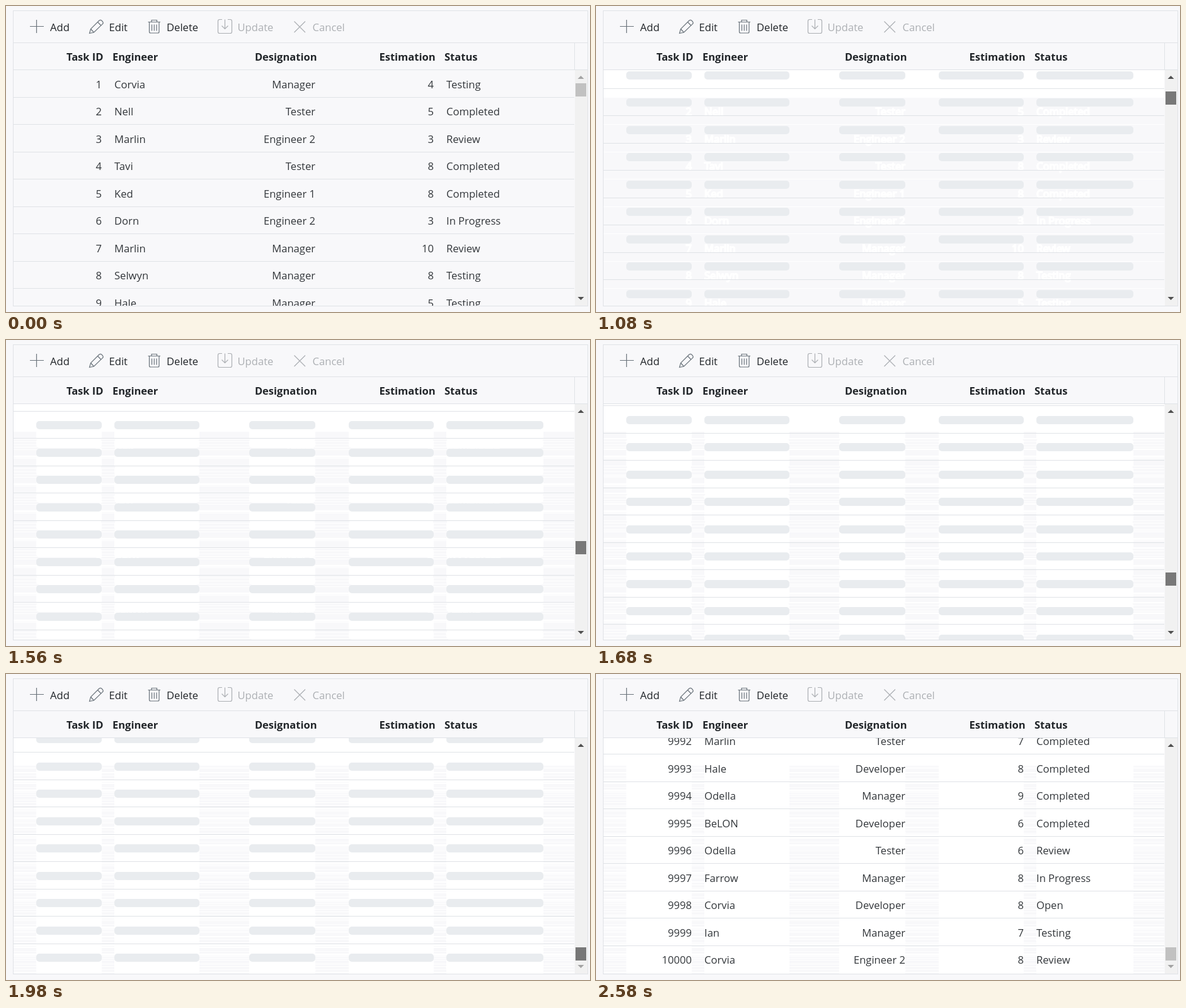
Animation of 927x487 px, one loop 3.66 s. Source, as an HTML page with a canvas:

```html
<!DOCTYPE html>
<html lang="en">
<head>
<meta charset="utf-8">
<title>Task grid scrolling</title>
<style>
html, body { margin: 0; width: 100%; height: 100%; overflow: hidden; background: #f8f8fa; }
canvas { display: block; }
</style>
</head>
<body>
<canvas id="stage" width="927" height="487"></canvas>
<script>
const ctx = document.getElementById('stage').getContext('2d');
const LOOP = 3660, STEP = 60, ROW = 43.5;
const SCROLL_START = 1080, LOADED = 2280;
const BACK = '#f8f8fa', LINE = '#e0e3e7', MUTED = '#adb0b4';
const INK = '#212529', CELL_INK = '#33373b';
const FONT = '16.6px "Open Sans", "Noto Sans", sans-serif';
const BOLD = '700 16.5px "Open Sans", "Noto Sans", sans-serif';

const columns = [
  { title: 'Task ID', left: 48, right: 152, align: 'right' },
  { title: 'Engineer', left: 172, right: 307, align: 'left' },
  { title: 'Designation', left: 386, right: 491, align: 'right' },
  { title: 'Estimation', left: 544, right: 679, align: 'right' },
  { title: 'Status', left: 699, right: 853, align: 'left' }
];

const parse = text => text.trim().split('\n').map(row => row.split('|'));
const firstRows = parse(`
1|Corvia|Manager|4|Testing
2|Nell|Tester|5|Completed
3|Marlin|Engineer 2|3|Review
4|Tavi|Tester|8|Completed
5|Ked|Engineer 1|8|Completed
6|Dorn|Engineer 2|3|In Progress
7|Marlin|Manager|10|Review
8|Selwyn|Manager|8|Testing
9|Hale|Manager|5|Testing`);
const lastRows = parse(`
9992|Marlin|Tester|7|Completed
9993|Hale|Developer|8|Completed
9994|Odella|Manager|9|Completed
9995|BeLON|Developer|6|Completed
9996|Odella|Tester|6|Review
9997|Farrow|Manager|8|In Progress
9998|Corvia|Developer|8|Open
9999|Ian|Manager|7|Testing
10000|Corvia|Engineer 2|8|Review`);

// Thumb position at each scroll step; the row offset follows from it.
const thumbTops = [136, 149, 166, 186, 209, 236, 265, 293, 320, 346, 370, 391, 409, 422, 431, 434.2];
const rowOffset = top => {
  const y = 131.25 - 1.0435 * (top - 136) - 101;
  return 101 + ((y % ROW) + ROW) % ROW;
};
const views = [
  { offset: 145, rows: firstRows },
  ...thumbTops.map(top => ({ offset: rowOffset(top) })),
  { offset: 127.5, rows: lastRows }
];
// The very last row of the table has no line below it.
const reachesEnd = view => views.indexOf(view) >= thumbTops.length;

function rect(x, y, w, h, color) {
  ctx.fillStyle = color;
  ctx.fillRect(x, y, w, h);
}

function label(text, x, y, color = INK, align = 'left', font = FONT) {
  ctx.font = font;
  ctx.textAlign = align;
  ctx.fillStyle = color;
  ctx.fillText(text, x, y);
}

function icon(path, color) {
  ctx.strokeStyle = color;
  ctx.lineWidth = 1.2;
  ctx.stroke(new Path2D(path));
}

function triangle(y, dir, color) {
  ctx.fillStyle = color;
  ctx.beginPath();
  ctx.moveTo(907.5, y + 2.5 * dir);
  ctx.lineTo(917.5, y + 2.5 * dir);
  ctx.lineTo(912.5, y - 2.5 * dir);
  ctx.fill();
}

// With erase set, the view's marks are wiped to white and the rest is left alone.
function drawView(view, erase) {
  const { offset, rows } = view;
  const lines = reachesEnd(view) ? 8 : 10;
  for (let i = 0; i < 10; i++) {
    const y = Math.floor(offset + i * ROW);
    if (i < lines) rect(12, y, 890, 1, erase ? '#fff' : LINE);
    columns.forEach((col, c) => {
      if (!rows) {
        ctx.fillStyle = erase ? '#fff' : '#e9ecef';
        ctx.beginPath();
        ctx.roundRect(col.left, y - 27, col.right - col.left, 13, 5);
        ctx.fill();
      } else if (rows[i]) {
        const x = col.align === 'right' ? col.right : col.left;
        label(rows[i][c], x, y - 14, erase ? '#fff' : CELL_INK, col.align);
        if (erase) {
          ctx.strokeStyle = '#fff';
          ctx.lineWidth = 1.8;
          ctx.strokeText(rows[i][c], x, y - 14);
        }
      }
    });
  }
}

// Every view leaves white traces behind, so all earlier views are replayed.
function drawBody(last) {
  ctx.save();
  ctx.beginPath();
  ctx.rect(12, 102, 890, 375);
  ctx.clip();
  if (last > 0) rect(12, 102, 890, 44, '#fff');
  for (let i = 0; i < last; i++) drawView(views[i], true);
  drawView(views[last], false);
  ctx.restore();
}

function drawToolbar() {
  const gray = '#6c757d';
  icon('M38 32.5H60M48.5 22V43', gray);
  icon('M132.5 43.5L134.5 36.5L148 23Q150 21.5 152 23.3L153.5 25Q155 27 153.3 28.7L139.5 42Z' +
       'M134.5 36.5L139.5 42M145.5 25.5L150.8 31', gray);
  icon('M225.5 25.5H245M231 25V22.5H239.5V25M227.5 26V41Q227.5 43 229.5 43H241Q243 43 243 41V26' +
       'M231.5 29.5V39.5M235.3 29.5V39.5M239 29.5V39.5', gray);
  icon('M343 21.5H339Q336.5 21.5 336.5 24V41Q336.5 43.5 339 43.5H356Q358.5 43.5 358.5 41V24' +
       'Q358.5 21.5 356 21.5H352M347.5 21.5V36M342.5 31.5L347.5 36.5L352.5 31.5', MUTED);
  icon('M457.5 24.5L475 42M475 24.5L457.5 42', MUTED);
  label('Add', 70, 40);
  label('Edit', 163.5, 40);
  label('Delete', 255, 40);
  label('Update', 367.5, 40, MUTED);
  label('Cancel', 486.5, 40, MUTED);
}

function drawHeader() {
  for (const { title, left, right, align } of columns) {
    label(title, align === 'right' ? right + 2.5 : left - 3, 87, INK, align, BOLD);
  }
  rect(12, 58, 911, 1, LINE);
  rect(12, 101, 911, 1, LINE);
  rect(902, 59, 1, 42, LINE);
  ctx.strokeStyle = LINE;
  ctx.lineWidth = 1;
  ctx.strokeRect(11.5, 7.5, 912, 470);
}

function thumbColor(time) {
  if (time < 120) return '#c1c1c1';
  if (time < 180) return '#b5b5b5';
  if (time < 840) return '#a8a8a8';
  if (time < 2340) return '#787878';
  return time < 2580 ? '#a8a8a8' : '#c1c1c1';
}

function drawScrollbar(time, view) {
  const top = view ? Math.ceil(thumbTops[Math.min(view, thumbTops.length) - 1]) : 123;
  rect(903, 102, 20, 375, '#f1f1f1');
  rect(904, top, 17, 21, thumbColor(time));
  triangle(113.5, 1, view ? '#505050' : '#a3a3a3');
  triangle(465.5, -1, view < thumbTops.length ? '#505050' : '#a3a3a3');
}

function viewAt(time) {
  if (time < SCROLL_START) return 0;
  if (time >= LOADED) return views.length - 1;
  return Math.min(Math.floor((time - SCROLL_START) / STEP) + 1, thumbTops.length);
}

let shown = '';
function frame(now) {
  const time = now % LOOP, view = viewAt(time);
  const key = view + thumbColor(time);
  if (key !== shown) {
    shown = key;
    rect(0, 0, 927, 487, BACK);
    drawBody(view);
    drawToolbar();
    drawHeader();
    drawScrollbar(time, view);
  }
  requestAnimationFrame(frame);
}
requestAnimationFrame(frame);
</script>
</body>
</html>
```
